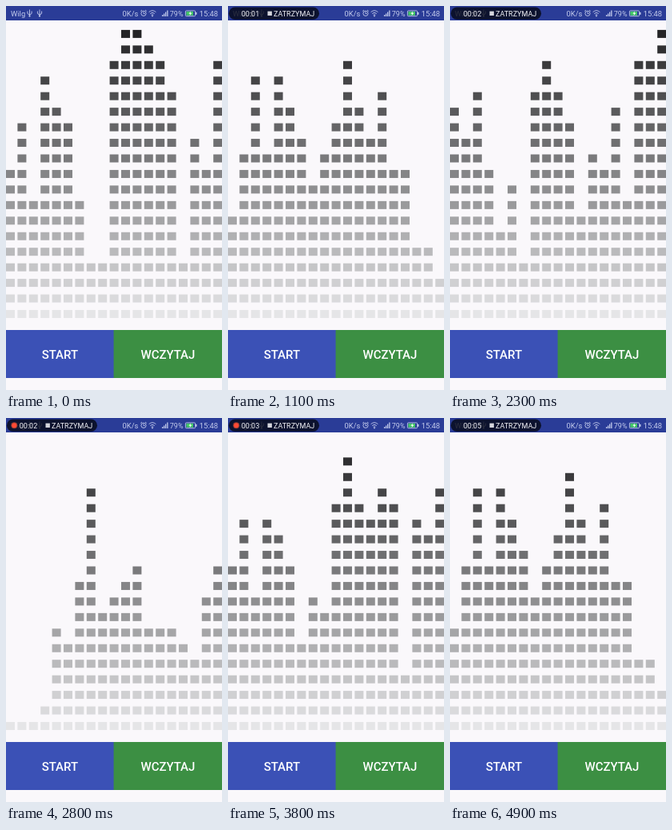
These frames come from a looping animation (270 px wide and 480 px high, 5000 ms). An HTML page:

```html
<!DOCTYPE html>
<html lang="pl">
<head>
<meta charset="utf-8">
<title>Equalizer</title>
<style>
  html, body { margin: 0; width: 100%; height: 100%; overflow: hidden; background: #faf8fb; }
  svg { display: block; width: 100%; height: 100%; }
  text { font-family: Roboto, Arial, sans-serif; }
  .status { font-size: 9.4px; fill: #c3cbec; }
  .label { font-size: 15px; font-weight: 500; fill: #fff; text-anchor: middle; }
  .pill { font-size: 9px; fill: #f4f4f8; }
  .line { fill: none; stroke: #c3cbec; stroke-width: .9; }
</style>
</head>
<body>
<svg viewBox="0 0 270 480">
  <defs>
    <g id="usb">
      <path class="line" d="M0 4.5V13M-2.6 6.5V9Q-2.6 10.3 0 10.8Q2.6 10.3 2.6 9V6.5"/>
      <circle cy="12.6" r="1.1" fill="#c3cbec"/>
    </g>
  </defs>
  <rect width="270" height="480" fill="#faf8fb"/>
  <g id="bars"></g>

  <rect width="270" height="18" fill="#2a3c97"/>
  <g class="status">
    <text x="6" y="12.8">Wilg</text>
    <text x="145.5" y="12.8">0K/s</text>
    <text x="204.8" y="12.8" style="font-size:9px">79%</text>
    <text x="241.8" y="12.8">15:48</text>
  </g>
  <use href="#usb" x="29.5"/>
  <use href="#usb" x="42"/>
  <g class="line">
    <circle cx="172" cy="9.3" r="3.1"/>
    <path d="M172 7.3V9.5H173.6M168.2 6.6L170 5M175.8 6.6L174 5"/>
    <path d="M178.6 7.6Q183 3.8 187.4 7.6M180.2 9.5Q183 7.1 185.8 9.5M181.7 11.2Q183 10.2 184.3 11.2"/>
  </g>
  <circle cx="183" cy="12.4" r=".9" fill="#c3cbec"/>
  <path d="M195 11h1.3v2H195zM197 9.4h1.3V13H197zM199 7.6h1.3V13H199zM201.2 5.4h1.3V13h-1.3z" fill="#c3cbec"/>
  <rect class="line" x="224.4" y="5.9" width="12.2" height="6.8" rx="1"/>
  <rect x="225.4" y="6.9" width="8.6" height="4.8" fill="#43c867"/>
  <rect x="237" y="7.8" width="1.5" height="3" fill="#c3cbec"/>
  <path d="M231 6.4L228.4 9.7H230.2L229.4 12.2L232.4 8.8H230.5Z" fill="#fff"/>

  <g id="recorder">
    <rect x="1" y="1.5" width="113" height="15.5" rx="7.7" fill="#060814" fill-opacity=".8"/>
    <g id="dot">
      <circle cx="10.3" cy="9.3" r="4" fill="#8d3a32"/>
      <circle cx="10.3" cy="9.3" r="3" fill="#ff4a35"/>
    </g>
    <text id="clock" class="pill" x="16.8" y="12.6">00:00</text>
    <rect x="49.5" y="6.6" width="5.4" height="5.4" fill="#d4d5dc"/>
    <text class="pill" x="57" y="12.6">ZATRZYMAJ</text>
  </g>

  <rect y="405" width="135" height="60" fill="#3b51b6"/>
  <rect x="134.6" y="405" width="135.4" height="60" fill="#3c8f43"/>
  <text class="label" x="67.5" y="440.8">START</text>
  <text class="label" x="202.5" y="440.8">WCZYTAJ</text>
</svg>
<script>
const LOOP = 5000, SIZE = 19;
const $ = id => document.getElementById(id);

const high = [10, 13, 8, 16, 14, 13, 8, 4, 4, 17, 19, 19, 18, 17, 15, 4, 12, 10, 17];
const wide = [14, 12, 15, 10, 6, 9, 4, 15, 17, 15, 13, 7, 11, 10, 14, 8, 17, 17, 19];
const spike = [1, 1, 1, 2, 7, 6, 10, 16, 8, 9, 10, 11, 7, 7, 7, 6, 5, 9, 11];
const hill = [7, 11, 16, 11, 16, 14, 12, 9, 11, 13, 17, 14, 12, 15, 10, 10, 5, 5, 3];
const low = [14, 8, 8, 5, 2, 2, 6, 2, 9, 10, 8, 5, 10, 11, 12, 9, 6, 5, 5];

// Blend two poses with a little ripple
const mix = (a, b, k) => a.map((h, i) =>
  Math.max(1, Math.min(SIZE, Math.round(h + (b[i] - h) * k + 1.5 * Math.sin(2 * i)))));

const poses = [
  high, mix(high, wide, 1 / 3), mix(high, wide, 2 / 3),
  wide, mix(wide, spike, .5), spike,
  hill, mix(hill, low, .5), low
];

// cells[column][row], row 0 at the bottom
const cells = Array.from({ length: SIZE }, (_, col) =>
  Array.from({ length: SIZE }, (_, row) => {
    const cell = document.createElementNS("http://www.w3.org/2000/svg", "rect");
    const grey = Math.round(229 - row * 10.7);
    const attrs = {
      x: col * 14.4, y: 380 - row * 19.45, width: 11, height: 10,
      fill: `rgb(${grey},${grey},${grey + 2})`
    };
    for (const name in attrs) cell.setAttribute(name, attrs[name]);
    return $("bars").appendChild(cell);
  }));

// One pose per 200 ms, with two beats held 100 ms longer
function poseAt(t) {
  const held = (t >= 2500 ? 100 : 0) + (t >= 4200 ? 100 : 0);
  return poses[Math.floor((t + 100 - held) / 200) % poses.length];
}

const dotOff = [[900, 1500], [1900, 2400], [3000, 3400], [4000, 4500], [4900, LOOP]];
const ticks = [900, 1900, 3000, 4000, 4900];

function draw(t) {
  const pose = poseAt(t);
  cells.forEach((column, i) => column.forEach((cell, row) =>
    cell.setAttribute("visibility", row < pose[i] ? "visible" : "hidden")));
  $("recorder").setAttribute("opacity", t < 200 ? 0 : t < 400 ? .6 : 1);
  $("dot").setAttribute("opacity", dotOff.some(([from, to]) => t >= from && t < to) ? 0 : 1);
  $("clock").textContent = "00:0" + ticks.filter(tick => t >= tick).length;
}

let start;
function frame(now) {
  start ??= now;
  draw((now - start) % LOOP);
  requestAnimationFrame(frame);
}
draw(0);
requestAnimationFrame(frame);
</script>
</body>
</html>
```
